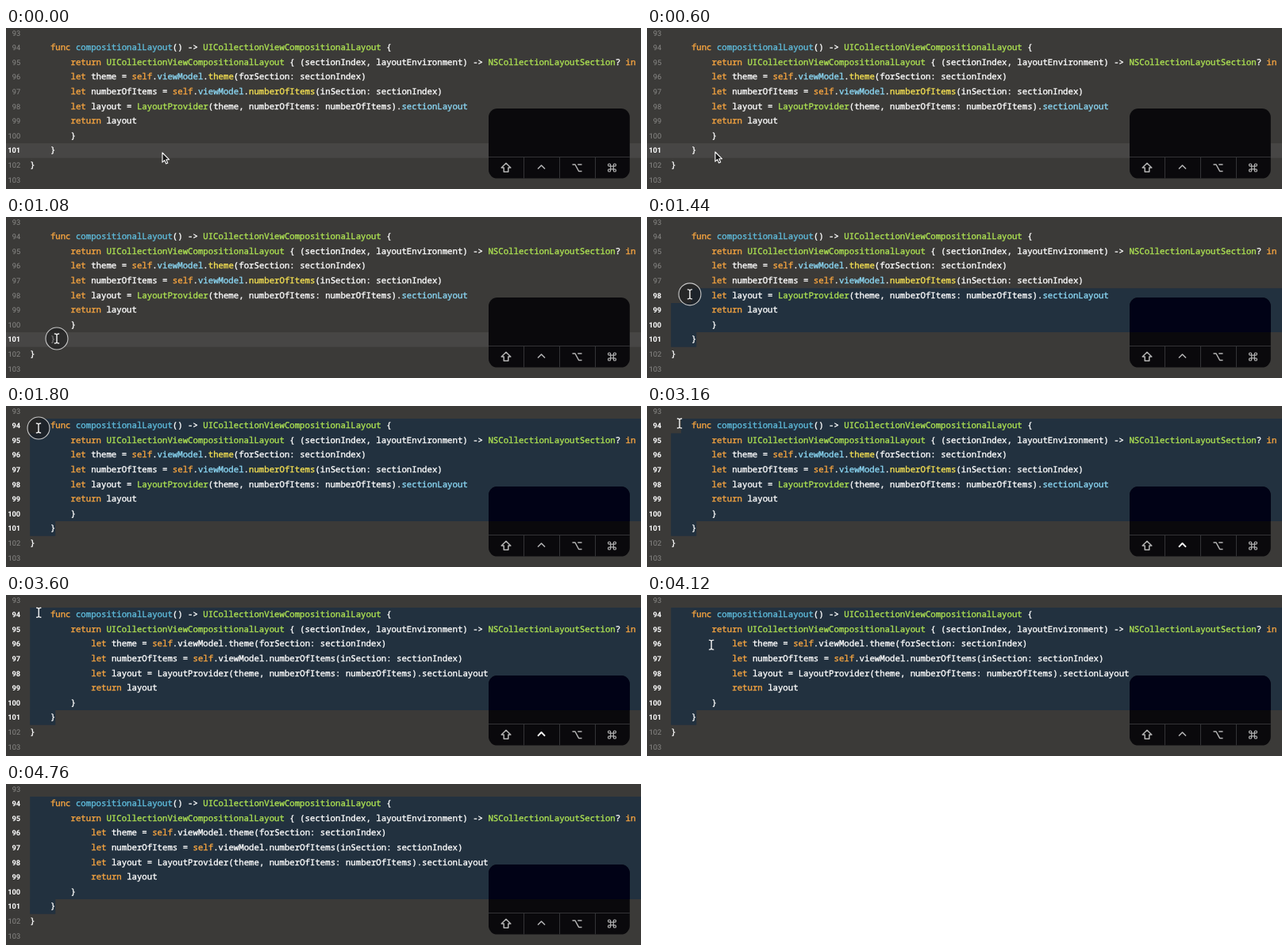
Write an HTML page that moves like this. It is 800x204 px and loops after 4800 ms.

```html
<!DOCTYPE html>
<html lang="en">
<head>
<meta charset="utf-8">
<title>Re-indenting code</title>
<style>
  html, body { margin: 0; width: 100%; height: 100%; overflow: hidden; background: #3b3a38; }
  svg { display: block; width: 800px; height: 204px; }
  text { white-space: pre; text-rendering: geometricPrecision; }
  .code { font: 10.7px "Noto Sans Mono", monospace; fill: #fff; stroke: #fff; stroke-width: .35; }
  .num { font: 9.3px Roboto, sans-serif; fill: #8b8a88; text-anchor: end; }
  .num.on { fill: #fff; font-weight: 700; }
  .k { fill: #f9a640; stroke: #f9a640; }
  .f { fill: #5fbcdc; stroke: #5fbcdc; }
  .t { fill: #aee352; stroke: #aee352; }
  .p { fill: #8bd8f5; stroke: #8bd8f5; }
  .y { fill: #f6e152; stroke: #f6e152; }
  .plain :not(.k) { fill: #fff; stroke: #fff; }
  .key { fill: none; stroke: #b4b4b4; stroke-width: 1.5; stroke-linejoin: round; }
  .key.on { stroke: #fff; stroke-width: 2; }
</style>
</head>
<body>
<svg viewBox="0 0 800 204">
  <defs>
    <path id="sel"/>
    <clipPath id="box"><rect x="608" y="102" width="177.8" height="88.6" rx="11"/></clipPath>
  </defs>
  <rect width="800" height="204" fill="#3b3a38"/>
  <rect id="line" y="146.1" width="800" height="18.6" fill="#474645"/>
  <use href="#sel" fill="#22313f"/>
  <g id="rows"></g>
  <g clip-path="url(#box)">
    <rect x="600" y="100" width="200" height="100" fill="#0a090c"/>
    <use href="#sel" fill="#010216"/>
    <path d="M608 163.5H786.5M652.5 163.5V191M697.5 163.5V191M742.5 163.5V191" stroke="#343437" fill="none"/>
  </g>
  <path class="key" d="M630 171.3L635.8 177H632.8V182.3H627.2V177H624.2Z"/>
  <path class="key" id="ctrl" d="M670 178.6L674.5 174L679 178.6"/>
  <path class="key" d="M713.5 173H717L721.6 181.5H725.5M720.3 173H725.5"/>
  <path class="key" id="cmd" style="stroke-width:1.2"/>
  <g id="mouse">
    <path id="arrow" d="M0 0V12.2L2.8 9.6L4.7 14L6.8 13.1L4.9 8.8H8.7Z" fill="#161616" stroke="#fff" stroke-width="1.1" stroke-linejoin="round"/>
    <g id="beam" fill="none" stroke-linecap="round">
      <circle id="ring" r="14" fill="#1b1b1c" fill-opacity=".6" stroke="#c9c9c9" stroke-width="1.1"/>
      <path d="M-2.6 -6Q-.4 -6 0 -4.6Q.4 -6 2.6 -6M0 -4.6V4.6M-2.6 6Q-.4 6 0 4.6Q.4 6 2.6 6" stroke="#f4f4f4" stroke-width="1.4"/>
    </g>
  </g>
</svg>
<script>
const LOOP = 4800, FIRST = 93, LAST = 103, PITCH = 18.6, CHAR = 6.42, LEFT = 30.2;
const PRESS = 1000, RELEASE = 2160, INDENT = 3440;
const $ = id => document.getElementById(id);
const midY = n => 24.6 + (n - 94) * PITCH;
const topY = n => midY(n) - PITCH / 2 + .6;
const colX = c => LEFT + c * CHAR;

// Each row: indent, then text where {class:word} marks a colour.
const rows = {
  94: [4, "{k:func} {f:compositionalLayout}() -> {t:UICollectionViewCompositionalLayout} {"],
  95: [8, "{k:return} {t:UICollectionViewCompositionalLayout} { (sectionIndex, layoutEnvironment) -> {t:NSCollectionLayoutSection}? {k:in}"],
  96: [8, "{k:let} theme = {k:self}.{p:viewModel}.{y:theme}(forSection: sectionIndex)"],
  97: [8, "{k:let} numberOfItems = {k:self}.{p:viewModel}.{y:numberOfItems}(inSection: sectionIndex)"],
  98: [8, "{k:let} layout = {t:LayoutProvider}(theme, numberOfItems: numberOfItems).{p:sectionLayout}"],
  99: [8, "{k:return} layout"],
  100: [8, "}"],
  101: [4, "}"],
  102: [0, "}"]
};

const paint = s => s.replace(/>/g, "&gt;").replace(/\{(\w):(\w+)\}/g, '<tspan class="$1">$2</tspan>');
let html = "";
for (let n = FIRST; n <= LAST; n++) {
  html += `<text class="num" id="n${n}" x="18.2" y="${midY(n) + 3.5}">${n}</text>`;
  if (rows[n]) html += `<text class="code" id="c${n}" x="${colX(rows[n][0])}" y="${midY(n) + 3.6}">${paint(rows[n][1])}</text>`;
}
$("rows").innerHTML = html;

// Command key: a square with a round loop outside each corner.
function corner(x, y) {
  const sweep = x * y > 0 ? 0 : 1;
  return `M${763.5 + x * 1.9} ${177 + y * 3.6}V${177 + y * 1.9}H${763.5 + x * 3.6}`
    + `a1.7 1.7 0 1 ${sweep} ${-x * 1.7} ${y * 1.7}`.replace(/^a.*/, `A1.7 1.7 0 1 ${sweep} ${763.5 + x * 1.9} ${177 + y * 3.6}`);
}
const loop = (x, y) => {
  const ix = 763.5 + x * 1.8, iy = 177 + y * 1.8;
  return `M${ix} ${iy}h${x * 1.6}a1.6 1.6 0 1 ${x * y > 0 ? 0 : 1} ${-x * 1.6} ${-y * 1.6}`;
};
const ring = (x, y) => `M${763.5 + x * 3.4 - 1.6} ${177 + y * 3.4}a1.6 1.6 0 1 0 3.2 0a1.6 1.6 0 1 0 -3.2 0`;
$("cmd").setAttribute("d", "M761.7 175.2h3.6v3.6h-3.6z" + ring(1, 1) + ring(-1, 1) + ring(1, -1) + ring(-1, -1));

// Pointer path: time, x, y
const path = [
  [0, 197, 158], [120, 196, 158], [600, 86, 157], [950, 65, 155], [1080, 64, 154],
  [1440, 54, 98], [1800, 41, 28], [2060, 41, 22], [3560, 41, 22], [4120, 81, 63], [4520, 215, 216]
];
const slope = (i, a) => (path[i + 1][a] - path[i][a]) / (path[i + 1][0] - path[i][0]);
function tangent(i, a) {
  if (i === 0 || i === path.length - 1) return 0;
  const p = slope(i - 1, a), q = slope(i, a);
  return p * q > 0 ? 2 * p * q / (p + q) : 0;
}
function along(t, a) {
  const i = path.findIndex((p, k) => k && t < p[0]) - 1;
  if (i < 0) return path[path.length - 1][a];
  const d = path[i + 1][0] - path[i][0], u = (t - path[i][0]) / d, v = 1 - u;
  return v * v * (1 + 2 * u) * path[i][a] + u * u * (3 - 2 * u) * path[i + 1][a]
    + d * u * v * (v * tangent(i, a) - u * tangent(i + 1, a));
}

const show = (id, on) => $(id).setAttribute("visibility", on ? "inherit" : "hidden");

function draw(t) {
  const x = along(t, 1), y = along(t, 2), indented = t >= INDENT;
  $("mouse").setAttribute("transform", `translate(${x} ${y})`);
  show("arrow", t < PRESS);
  show("beam", t >= PRESS);
  show("ring", t >= PRESS && t < RELEASE);

  // The selection runs from the pointer to the end of row 101.
  let row = 101, col = 5;
  if (t >= PRESS) {
    const s = Math.min(t, RELEASE);
    row = Math.max(94, Math.min(101, 94 + Math.floor((along(s, 2) - topY(94)) / PITCH)));
    col = indented ? 0 : Math.round((along(s, 1) - LEFT) / CHAR);
    if (row === 101) col = Math.min(col, 5);
  }
  const end = colX(5), from = colX(col), y0 = topY(row), y1 = topY(101), y2 = topY(102);
  const any = row < 101 || col < 5;
  $("sel").setAttribute("d", !any ? "" : row === 101
    ? `M${from} ${y0}H${end}V${y2}H${from}Z`
    : `M${from} ${y0}H800V${y1}H${end}V${y2}H${LEFT}V${y0 + PITCH}H${from}Z`);
  show("line", !any);
  for (let n = FIRST; n <= LAST; n++) $("n" + n).classList.toggle("on", n >= row && n <= 101);

  // Re-indented rows lose their symbol colours until they are parsed again.
  for (let n = 96; n <= 99; n++) {
    $("c" + n).setAttribute("x", colX(indented ? 12 : 8));
    $("c" + n).classList.toggle("plain", indented);
  }
  $("ctrl").classList.toggle("on", t >= 2920 && t < 3640);
}

const start = performance.now();
function tick() {
  draw((performance.now() - start) % LOOP);
  requestAnimationFrame(tick);
}
draw(0);
requestAnimationFrame(tick);
</script>
</body>
</html>
```
